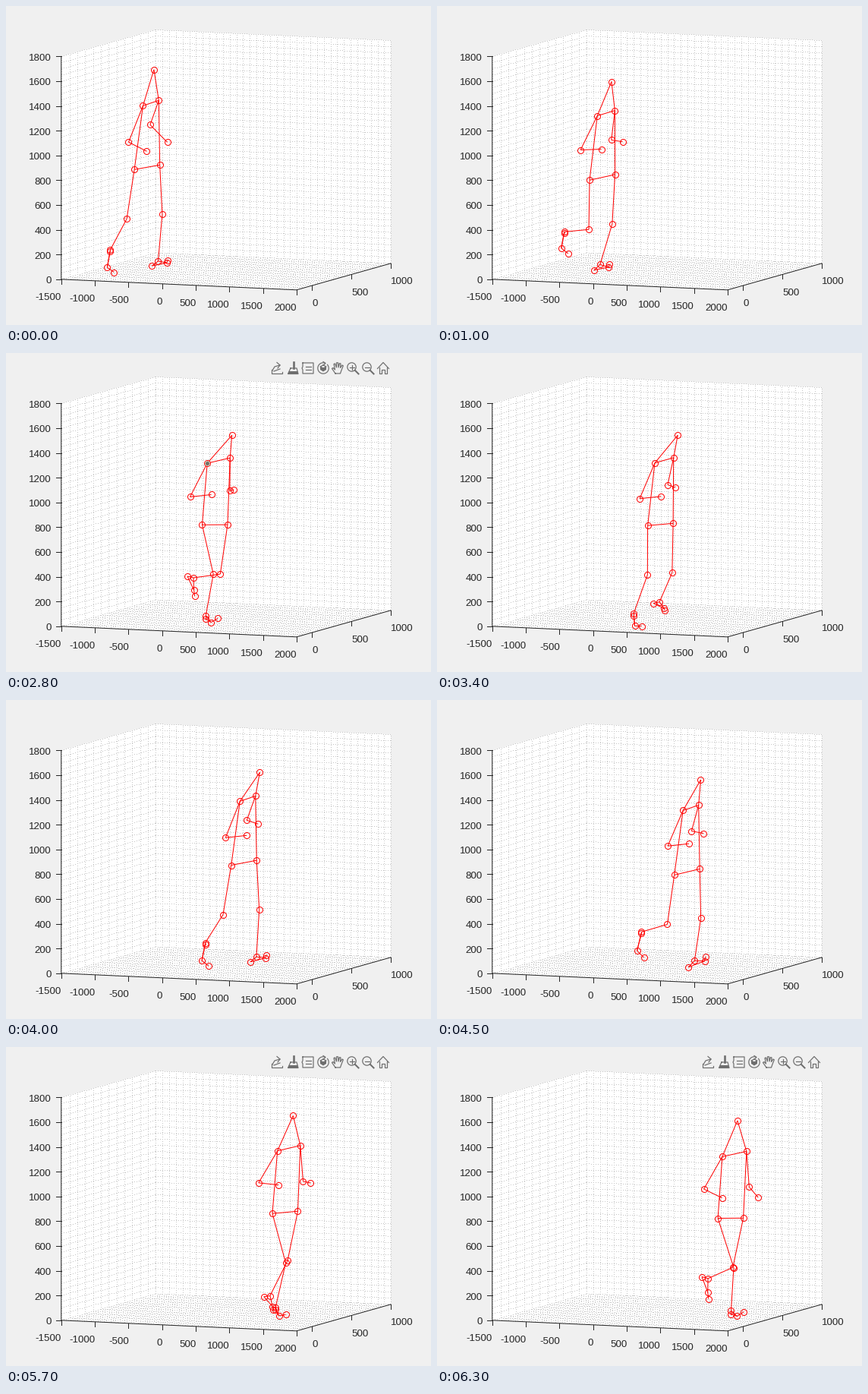
A matplotlib script that plays this animation: 560 by 420 pixels, repeating every 6400 ms.

```python
import numpy as np
import matplotlib.pyplot as plt
from matplotlib.animation import FuncAnimation
from matplotlib.collections import LineCollection
from matplotlib.patches import Circle, Polygon

FRAMES, STEP = 64, 100
LOOP, STRIDE = FRAMES * STEP, 3920  # ms
PX = 0.72  # points per pixel at 100 dpi
INK, RED, GREY = "#262626", "#ff0000", "#6e6e6e"

plt.rcParams["font.family"] = "Liberation Sans"
fig = plt.figure(figsize=(5.6, 4.2), dpi=100, facecolor="#f0f0f0")
ax = fig.add_axes([0, 0, 1, 1])
ax.set_xlim(0, 560)
ax.set_ylim(420, 0)
ax.axis("off")

# ---- axes box: parallel projection of x, y, z to pixels ----
X0, X1, Y0, Y1, TOP = -1500, 2000, -200, 1000, 1800


def project(x, y, z):
    u, v, w = (x - X0) / (X1 - X0), (y - Y0) / (Y1 - Y0), z / TOP
    return np.array([72.8 + 310 * u + 124 * v, 359.8 + 14 * u - 34.9 * v - 293.4 * w])


def wall(*corners):
    ax.add_patch(Polygon([project(*c) for c in corners], fc="white", ec="none", zorder=0))


def dotted(start, end, gap=3):
    """Whole-pixel dots from start to end."""
    a, b = project(*start), project(*end)
    size = np.abs(b - a).max()
    part = np.arange(0, size, gap)[:, None] / size
    return np.floor(a + (b - a) * part) + 0.5


def tick(at, mark, value, shift, align):
    x, y = at
    ax.plot([x, x + mark[0]], [y, y + mark[1]], color=INK, lw=PX, zorder=2)
    ax.text(x + shift[0], y + shift[1] + 5.3, str(value), ha=align, va="baseline",
            color=INK, fontsize=13.33 * PX)


def draw_box():
    wall((X0, Y0, 0), (X0, Y1, 0), (X0, Y1, TOP), (X0, Y0, TOP))
    wall((X0, Y1, 0), (X1, Y1, 0), (X1, Y1, TOP), (X0, Y1, TOP))
    wall((X0, Y0, 0), (X1, Y0, 0), (X1, Y1, 0), (X0, Y1, 0))

    grid = []
    for x in range(X0, X1 + 1, 100):
        grid += [dotted((x, Y1, 0), (x, Y1, TOP)), dotted((x, Y0, 0), (x, Y1, 0))]
    for y in range(Y0, Y1 + 1, 100):
        grid += [dotted((X0, y, 0), (X0, y, TOP)), dotted((X0, y, 0), (X1, y, 0))]
    for z in range(0, TOP + 1, 50):
        grid += [dotted((X0, Y0, z), (X0, Y1, z)), dotted((X0, Y1, z), (X1, Y1, z))]
    dots = np.unique(np.concatenate(grid), axis=0)
    ax.plot(dots[:, 0], dots[:, 1], ",", color="#c6c6c6", zorder=1)

    edge = [project(X0, Y0, TOP), project(X0, Y0, 0), project(X1, Y0, 0), project(X1, Y1, 0)]
    ax.plot(*zip(*edge), color=INK, lw=PX, zorder=2)

    for x in range(X0, X1 + 1, 500):
        tick(project(x, Y0, 0), (0, 6), x, (0.3, 22), "right")
    for y in range(0, Y1 + 1, 500):
        tick(project(X1, y, 0), (0, 6), y, (0, 22), "left")
    for z in range(0, TOP + 1, 200):
        tick(project(X0, Y0, z), (-7, 0), z, (-13, 0), "right")


# ---- toolbar shown while the pointer is over the plot ----
toolbar = []


def stroke(*pts, w=1.2):
    toolbar.extend(ax.plot(*zip(*pts), color=GREY, lw=w * PX, zorder=5))


def fill(*pts):
    toolbar.append(ax.add_patch(Polygon(pts, fc=GREY, ec="none", zorder=5)))


def ring(x, y, r):
    toolbar.append(ax.add_patch(Circle((x, y), r, fc="none", ec=GREY, lw=1.2 * PX, zorder=5)))


def draw_toolbar():
    # export
    stroke((350, 22), (350, 27), (364, 27), (364, 25))
    stroke((351, 23), (354, 18), (361, 16))
    stroke((357, 12.5), (361, 16), (358, 20))
    stroke((353, 24), (361, 21))
    # brush
    stroke((379, 12), (379, 20), w=2.6)
    stroke((375, 20), (371.5, 27.5), (385, 27.5), (383, 20), (375, 20))
    fill((373, 24), (384, 24), (385, 27.5), (371.5, 27.5))
    # data tip
    stroke((391, 13), (405, 13), (405, 27), (391, 27), (391, 22), (390, 20), (391, 18), (391, 13))
    for y in (18, 22):
        stroke((394.5, y), (401.5, y))
    # rotate
    ang = np.radians(np.linspace(-40, 285, 40))
    stroke(*zip(418 + 7.2 * np.cos(ang), 20 + 7.2 * np.sin(ang)))
    stroke((418, 11.5), (421, 13.5), (418.5, 16))
    stroke((418, 16), (422, 18), (418, 20), (414, 18), (418, 16))
    fill((414, 18), (418, 20), (422, 18), (422, 22), (418, 24.5), (414, 22))
    # hand
    stroke((434, 27), (429.5, 20.5), (431, 19.5), (433.5, 22), (432, 14.5), (433.5, 14),
           (435.5, 19), (435.5, 12.8), (437.5, 12.8), (438, 19), (439.5, 13.5), (441, 14),
           (440.5, 19.5), (443, 16), (444.3, 16.8), (441.5, 24), (440.5, 27), (434, 27))
    # zoom in, zoom out
    for x in (455.5, 475.5):
        ring(x, 18.5, 5.7)
        stroke((x + 4.3, 22.8), (x + 9, 27.5), w=2)
        stroke((x - 3, 18.5), (x + 3, 18.5))
    stroke((455.5, 15.5), (455.5, 21.5))
    # home
    stroke((489.5, 20.5), (497, 12.5), (504.5, 20.5))
    stroke((492, 19), (492, 27), (495.3, 27), (495.3, 21.5), (498.7, 21.5), (498.7, 27),
           (502, 27), (502, 19))


# ---- walker: stride angles in degrees, the right leg half a stride behind ----
def wave(angle, peak=0):
    return np.cos(np.radians(angle - peak))


def vec(x, y):
    return np.array([x, y], float)


# ankle below the hip: angle, across, down
ANKLE = np.array([(0, -35, 106), (40, -45, 79), (77, -43, 70), (92, -36, 68), (108, -21, 82),
                  (165, -3, 124), (187, 9, 127), (218, 7, 122), (265, -8, 119),
                  (330, -30, 114)], float)
knots, path = ANKLE[:, 0], ANKLE[:, 1:]
span = np.diff(knots, append=360)
after = np.roll(path, -1, axis=0)
rate = (after - path) / span[:, None]
before = np.roll(rate, 1, axis=0)
turn = rate * before <= 0
slope = np.where(turn, 0, 2 * rate * before / np.where(turn, 1, rate + before))


def ankle_swing(angle):
    """Closed monotone cubic through the ankle points."""
    angle %= 360
    k = np.searchsorted(knots, angle, side="right") - 1
    n, h = (k + 1) % len(knots), span[k]
    u = (angle - knots[k]) / h
    return ((1 + 2 * u) * (1 - u) ** 2 * path[k] + u * (1 - u) ** 2 * h * slope[k]
            + u * u * (3 - 2 * u) * path[n] + u * u * (u - 1) * h * slope[n])


def leg(hip, a, left):
    """Knee, ankle, heel, ball and toe; the two sides are seen from different angles."""
    side = 1 if left else -1
    knee = hip + vec(-0.3 + 12.7 * wave(a, 200) + side * (5.3 + 3.8 * wave(a, 215)), 65)
    ankle = hip + ankle_swing(a) + vec(side * (6 + 4.5 * wave(a, 230)), 0)
    heel = ankle + vec(-4 + 4 * side, 3 - (1.5 if left else 5.5) * wave(a, 55))
    ball = ankle + vec(3.8 - 2.8 * side + 7 * wave(a, 225), 12.5 + 3.5 * side + 9 * wave(a, 40))
    toe = ball + vec(5 + 4 * side, 1.5 + 7.5 * wave(a, 50))
    return [knee, ankle, heel, ball, toe]


def joints(ms):
    a = 360 * ms / STRIDE
    nod = np.cos(2 * np.pi * ms / LOOP)
    drop = ((1 + nod) / 2) ** 8  # arms hang lower at both ends of the loop

    pelvis = vec(185.9 + 0.0319 * ms, 225.3 + 0.0003 * ms - 13 * wave(a) ** 8)
    chest = pelvis + vec(5, -84.5)
    head = chest + vec(11 - 7 * nod, -38.5 - 5.5 * nod)
    hips = vec(33.5, -4 - 4 * wave(a, 60)) / 2
    shoulders = vec(26 - 6 * wave(a, 30), -7) / 2

    l_elbow = chest - shoulders + vec(-22 + 3 * wave(a), 45 + 3 * wave(a))
    l_wrist = l_elbow + vec(28 - 4 * drop, -3 + 15 * drop)
    r_elbow = chest + shoulders + vec(-3.5 - 8 * wave(a, 10), 40 - 8 * wave(a, 10))
    r_wrist = r_elbow + vec(10 + 6 * wave(a, 40) + 8 * drop, 5 * wave(a) + 18 * drop)

    left = [chest - shoulders, l_elbow, l_wrist, pelvis - hips]
    right = [chest + shoulders, r_elbow, r_wrist, pelvis + hips]
    return np.array([head, *left, *leg(pelvis - hips, a, True),
                     *right, *leg(pelvis + hips, a + 180, False)])


# each side: shoulder, elbow, wrist, hip, knee, ankle, heel, ball, toe
bones = [(1, 10), (4, 13)]
for s in (1, 10):
    bones += [(0, s), (s, s + 1), (s + 1, s + 2), (s, s + 3), (s + 3, s + 4), (s + 4, s + 5),
              (s + 5, s + 6), (s + 6, s + 7), (s + 5, s + 7), (s + 7, s + 8)]

draw_box()
draw_toolbar()
limbs = LineCollection([], colors=RED, linewidths=PX, zorder=3)
ax.add_collection(limbs)
dots, = ax.plot([], [], "o", mfc="none", mec=RED, ms=8 * PX, mew=PX, zorder=4)
hover, = ax.plot([], [], "o", mfc="#6f6f66", mec="#cdbfae", ms=6 * PX, mew=1.2 * PX, zorder=6)


def update(i):
    ms = i * STEP
    p = joints(ms)
    limbs.set_segments([p[[m, n]] for m, n in bones])
    dots.set_data(p[:, 0], p[:, 1])
    hover.set_data(p[1:2, 0], p[1:2, 1])
    hover.set_visible(ms == 2800)
    shown = 200 <= ms < 600 or 2500 <= ms < 3200 or ms >= 4600
    for part in toolbar:
        part.set_visible(shown)
    return [limbs, dots, hover, *toolbar]


anim = FuncAnimation(fig, update, frames=FRAMES, interval=STEP, repeat=True, blit=False)
plt.show()
```
